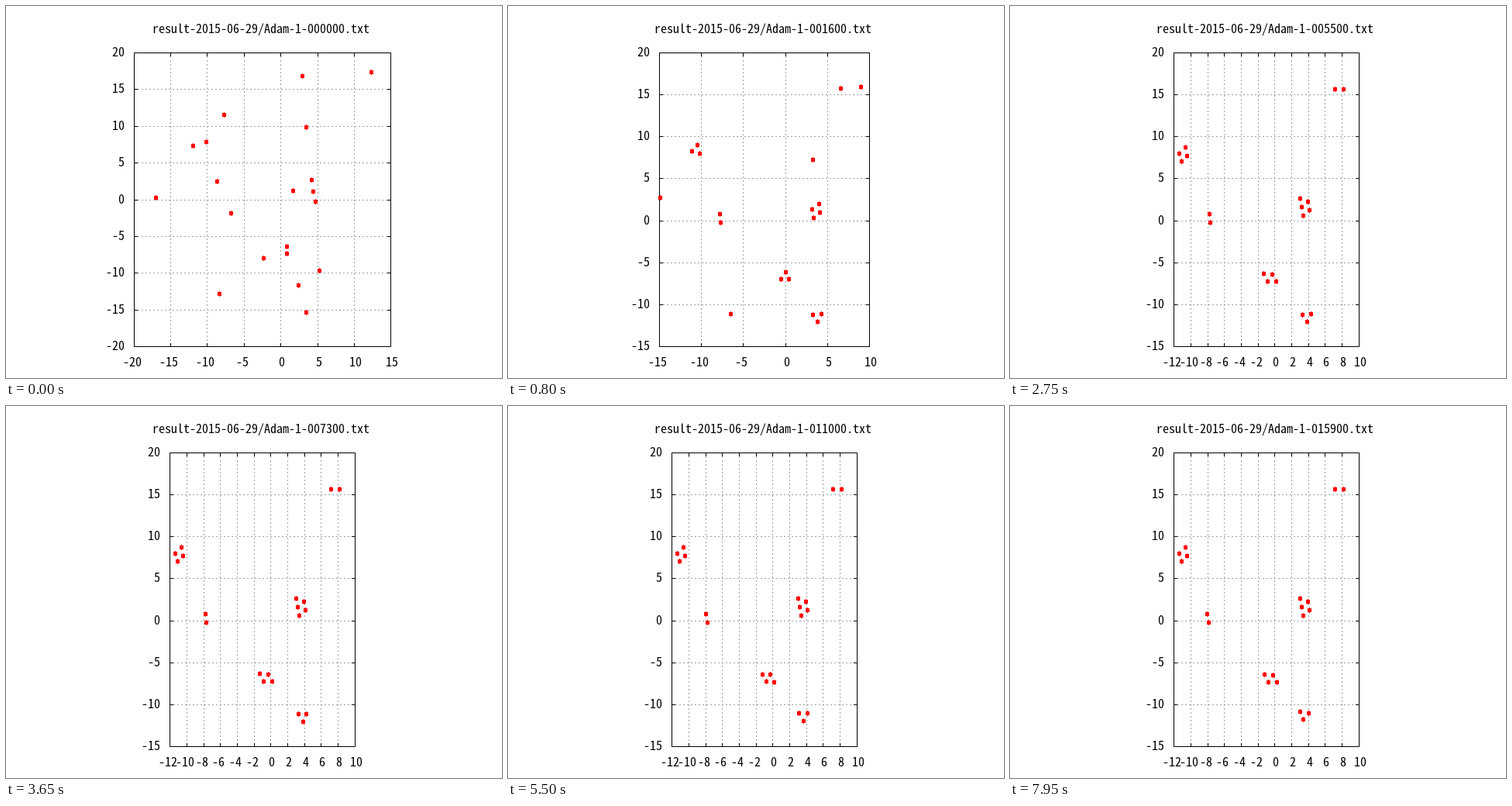
An HTML page that plays this animation: 640 px wide and 480 px high, repeating every 8 s.

```html
<!DOCTYPE html>
<html lang="en">
<head>
<meta charset="utf-8">
<title>Scatter plot</title>
<style>
  html, body { margin: 0; width: 100%; height: 100%; overflow: hidden; background: #fff; }
  svg { display: block; width: 640px; height: 480px; }
  text { font: 16px "Noto Sans Mono CJK JP", "Noto Sans CJK JP", "Noto Sans Mono", monospace; }
  path { fill: none; stroke: #000; shape-rendering: crispEdges; }
  .grid { stroke: #a0a0a0; stroke-dasharray: 2 3; }
  .dots { fill: #f00; stroke: none; }
  .right { text-anchor: end; }
  .mid { text-anchor: middle; }
</style>
</head>
<body>
<svg viewBox="0 0 640 480">
  <text x="189" y="35">result-2015-06-29/Adam-1-<tspan id="count">000000</tspan>.txt</text>
  <g id="plot"></g>
</svg>
<script>
const STEP = 50, FRAMES = 160;
const TOP = 60, BOTTOM = 439, CENTER = 330.5;
const PACE = 3.7;         // steps per unit of distance travelled
const RECOIL = .06;       // how far a group gives way to its last arrival
const DRIFT_START = 60;

// Dots gather one unit around a hub, 60 degrees apart, clockwise from `turn`.
// The first start belongs to the hub; drift is [dx, dy, degrees] over the loop.
const groups = [
  { hub: [7.175, 15.66], turn: 0, starts: [[2.94, 16.83], [12.33, 17.35]] },
  { hub: [-11.387, 8], turn: 45, pace: 3.03,
    starts: [[-11.95, 7.33], [-7.73, 11.55], [-10.15, 7.86], [-17.01, .26]] },
  { hub: [3.204, 1.62], turn: 99,
    starts: [[1.67, 1.21], [3.47, 9.87], [4.21, 2.69], [4.42, 1.11], [4.74, -.27]] },
  { hub: [-7.786, .79], turn: -85, drift: [-.28, 0, 6], starts: [[-8.69, 2.48], [-6.78, -1.85]] },
  { hub: [-.86, -7.22], turn: 117, drift: [.1, -.1, 0],
    starts: [[-2.34, -7.97], [-8.37, -12.82], [.83, -6.39], [.83, -7.34]] },
  { hub: [3.295, -11.21], turn: 5, drift: [-.28, .34, -12],
    starts: [[2.41, -11.66], [5.27, -9.66], [3.47, -15.35]] }
];

const clamp = v => Math.min(1, Math.max(0, v));
const mix = (a, b, p) => a + (b - a) * p;

function slot({ hub: [x, y], turn, drift = [0, 0, 0] }, i, n) {
  const p = clamp((n - DRIFT_START) / (FRAMES - 1 - DRIFT_START));
  const angle = (turn + drift[2] * p - 60 * (i - 1)) * Math.PI / 180;
  const reach = i ? 1 : 0;
  return [x + drift[0] * p + reach * Math.cos(angle), y + drift[1] * p + reach * Math.sin(angle)];
}

function place(group, n) {
  const dots = group.starts.map(([x, y], i) => {
    const [tx, ty] = slot(group, i, n);
    const [hx, hy] = slot(group, i, 0);
    const steps = Math.hypot(hx - x, hy - y) * (group.pace || PACE);
    // Attraction grows as the gap closes: the squared distance shrinks evenly.
    return { x, y, tx, ty, steps, p: 1 - Math.sqrt(1 - clamp(n / steps)) };
  });
  const last = dots.reduce((a, b) => b.steps > a.steps ? b : a);
  const gap = RECOIL * (1 - last.p);
  const dx = gap * (last.tx - last.x), dy = gap * (last.ty - last.y);
  return dots.map(dot => {
    const give = dot === last ? 0 : 1;
    return [mix(dot.x, dot.tx + give * dx, dot.p), mix(dot.y, dot.ty + give * dy, dot.p)];
  });
}

function axis(values) {
  const lo = Math.min(...values), hi = Math.max(...values);
  const step = hi - lo < 20 ? 2 : 5;
  const min = Math.floor(lo / step) * step, max = Math.ceil(hi / step) * step;
  const ticks = [];
  for (let v = min; v <= max; v += step) ticks.push(v);
  return { min, max, ticks };
}

function draw(n) {
  const points = groups.flatMap(group => place(group, n));
  const ax = axis(points.map(p => p[0])), ay = axis(points.map(p => p[1]));
  const scale = (BOTTOM - TOP) / (ay.max - ay.min);
  const px = v => Math.round(CENTER + (v - (ax.min + ax.max) / 2) * scale);
  const py = v => Math.round(BOTTOM - (v - ay.min) * scale);
  const left = px(ax.min), right = px(ax.max);
  let grid = '', marks = '', labels = '', dots = '';

  for (const v of ax.ticks) {
    const x = px(v);
    if (v > ax.min && v < ax.max) grid += `M${x + .5} ${TOP}V${BOTTOM}`;
    marks += `M${x + .5} ${BOTTOM + 1}v-5M${x + .5} ${TOP}v5`;
    labels += `<text class="mid" x="${x + (v < 0 ? -2 : 2)}" y="465">${v}</text>`;
  }
  for (const v of ay.ticks) {
    const y = py(v);
    if (v > ay.min && v < ay.max) grid += `M${left} ${y + .5}H${right}`;
    marks += `M${left} ${y + .5}h5M${right + 1} ${y + .5}h-5`;
    labels += `<text class="right" x="${left - 12}" y="${y + 5}">${v}</text>`;
  }
  for (const [x, y] of points) {
    dots += `M${px(x) - 2} ${py(y) - 2}h2v-1h1v1h2v5h-2v1h-1v-1h-2z`;
  }
  const frame = `M${left + .5} ${TOP + .5}H${right + .5}V${BOTTOM + .5}H${left + .5}z`;
  document.getElementById('plot').innerHTML =
    `<path class="grid" d="${grid}"/><path d="${marks}${frame}"/>${labels}<path class="dots" d="${dots}"/>`;
  document.getElementById('count').textContent = String(n * 100).padStart(6, '0');
}

const begin = performance.now();
let shown = -1;
function tick() {
  const n = Math.floor((performance.now() - begin) / STEP) % FRAMES;
  if (n !== shown) draw(shown = n);
  requestAnimationFrame(tick);
}
tick();
</script>
</body>
</html>
```
